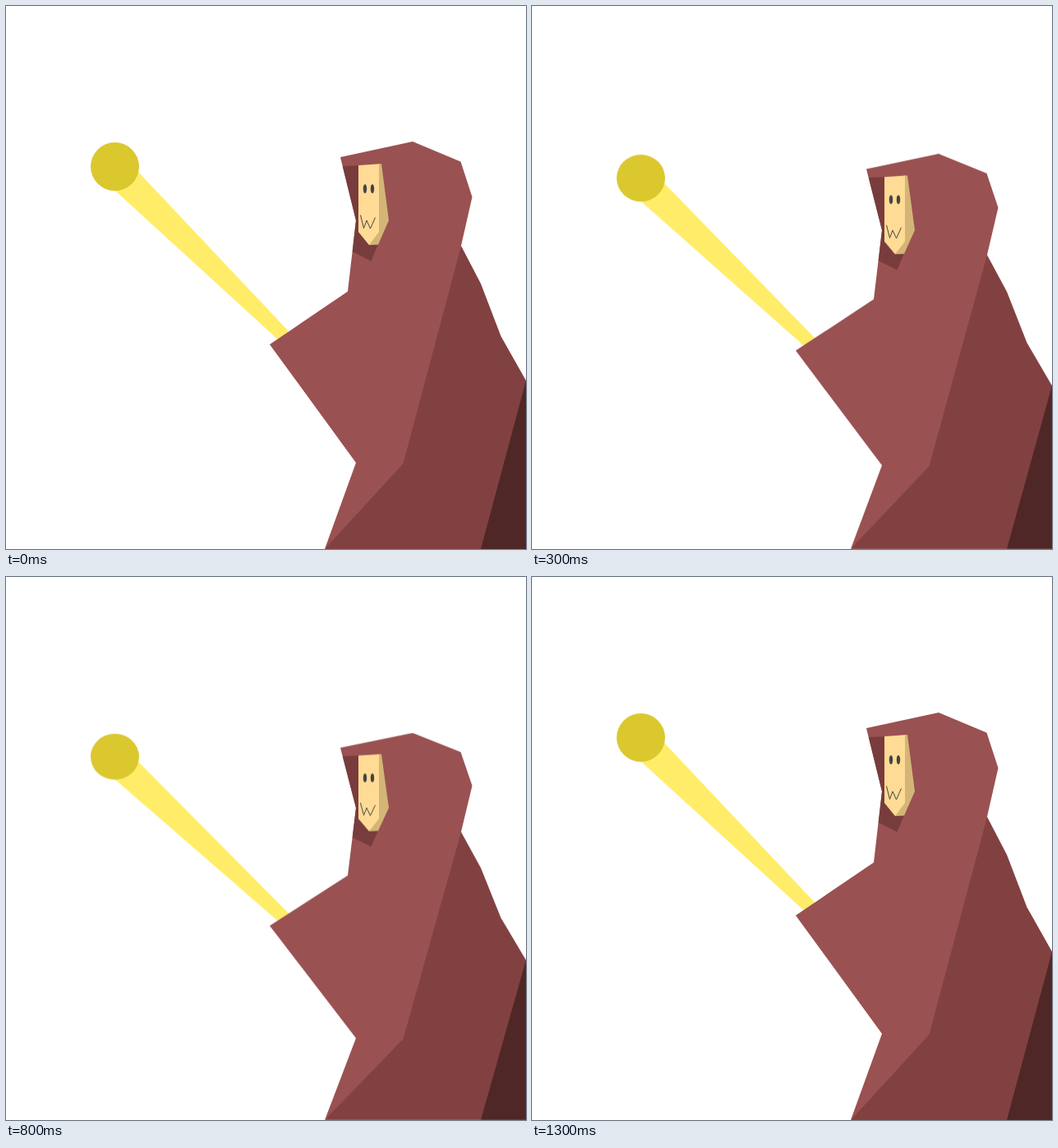
Write an HTML page without scripts that moves like this. It is 633 by 661 pixels and loops after 1.4 s.

```html
<!DOCTYPE html>
<html lang="en">
<head>
<meta charset="utf-8">
<title>Hooded figure</title>
<style>
  html, body { margin: 0; width: 100%; height: 100%; overflow: hidden; background: #fff; }
  svg { display: block; width: 633px; height: 661px; clip-path: inset(0 0 0 103px); }

  /* The figure sinks and rises from the floor, one percent per step. */
  .figure { transform-origin: 0 661px; animation: breathe 1400ms step-end infinite; }
  @keyframes breathe {
    0%, 92.85%     { transform: scaleY(1); }
    7.14%, 85.71%  { transform: translateX(-1px) scaleY(.99); }
    14.28%, 78.57% { transform: scaleY(.98); }
    21.42%, 71.42% { transform: scaleY(.97); }
    28.57%, 64.28% { transform: scaleY(.96); }
    35.71%, 57.14% { transform: scaleY(.95); }
    42.85%         { transform: scaleY(.94); }
    100%           { transform: scaleY(1); }
  }
</style>
</head>
<body>
<svg viewBox="0 0 633 661">
  <clipPath id="edge"><path d="M0 0H633V661H0Z"/></clipPath>
  <g class="figure">
    <g clip-path="url(#edge)">
      <!-- staff -->
      <path fill="#ffed69" d="M150 190L162 203L345 397L360 413L340 414L331 406L132 224Z"/>
      <circle fill="#dbc82f" cx="132.5" cy="195.5" r="29.5"/>

      <!-- cloak -->
      <path fill="#824141" d="M553 290L578 338L602.5 402L633 456V661H388L470 550Z"/>
      <path fill="#4f2727" d="M633 456V661H578Z"/>
      <path fill="#9a5151" d="M407 184L495 165L553.5 189.5L567.5 232.5L553.5 294L483.5 557L388 661L426 556L321 412L416 347.5L426 261Z"/>

      <!-- face -->
      <path fill="#783c3c" d="M409.8 195L432 194V270L453 290L444.5 310.5L421.7 299L426 261Z"/>
      <path fill="#d3b677" d="M453 192.2L457 192L466 261L453 290.5L442 291L450 270Z"/>
      <path fill="#ffdb95" d="M429 194L454 192.3V275L442 291L429 275Z"/>
      <g fill="#444">
        <ellipse cx="437" cy="222.5" rx="2.2" ry="5.5"/>
        <ellipse cx="446" cy="222.5" rx="2.2" ry="5.5"/>
      </g>
      <path fill="none" stroke="#444" d="M431.5 254.5L435.5 270.5L439 261L443.5 271L449.5 257.5"/>
    </g>
  </g>
</svg>
</body>
</html>
```
